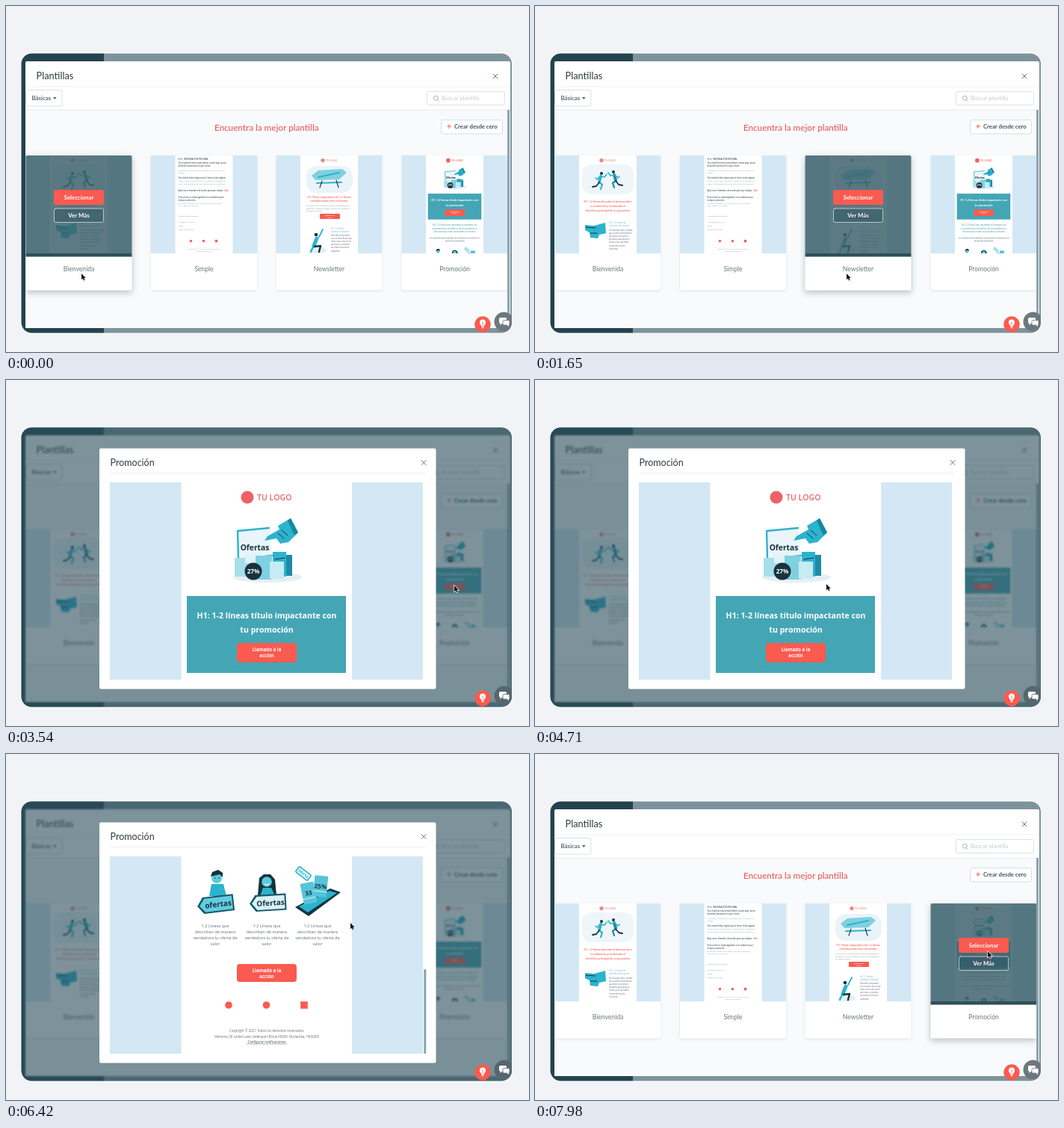
These frames come from a looping animation (700x463 px, 8000 ms). An HTML page with a canvas:

```html
<!DOCTYPE html>
<html lang="es">
<head>
<meta charset="utf-8">
<title>Plantillas</title>
<style>
html, body { margin: 0; width: 100%; height: 100%; overflow: hidden; background: #f1f3f6; }
canvas { display: block; width: 100%; height: 100%; }
</style>
</head>
<body>
<canvas id="stage"></canvas>
<script>
const W = 700, H = 463, LOOP = 8000;
const UI = 'Lato, sans-serif', MAIL = '"Open Sans", sans-serif';
const RED = '#fb5a50', TEAL = '#44a6b5', CYAN = '#2cb3ce', INK = '#16333e', BLUE = '#d3e8f4';
const OPEN = 3050, CLOSE = 7080, SCROLL_MAX = 353, PAGE_H = 617, THUMB_SCALE = 0.336;
const ratio = window.devicePixelRatio || 1;

function makeContext(canvas) {
  canvas.width = W * ratio;
  canvas.height = H * ratio;
  const ctx = canvas.getContext('2d');
  ctx.scale(ratio, ratio);
  return ctx;
}
const stage = makeContext(document.getElementById('stage'));
const sceneCanvas = document.createElement('canvas');
const scene = makeContext(sceneCanvas);
let c = scene;

// ---- time helpers ----
const clamp = v => Math.max(0, Math.min(1, v));
const smooth = v => { v = clamp(v); return v * v * (3 - 2 * v); };
const mix = (a, b, k) => a + (b - a) * k;

function track(keys, t) {
  let i = 1;
  while (i < keys.length - 1 && keys[i][0] < t) i++;
  const a = keys[i - 1], b = keys[i];
  const k = smooth((t - a[0]) / (b[0] - a[0]));
  return a.slice(1).map((v, n) => mix(v, b[n + 1], k));
}

const pointerKeys = [
  [0, 101, 358], [300, 101, 358], [800, 258, 360], [1000, 266, 360], [1500, 417, 358],
  [1800, 417, 358], [2350, 592, 330], [2700, 601, 277], [3540, 600, 275], [3700, 600, 275],
  [4500, 390, 273], [5700, 390, 273], [6420, 461, 226], [6900, 558, 109], [7150, 558, 109],
  [7750, 606, 264], [8000, 606, 264]
];
const scrollKeys = [[4950, 0], [5160, 305], [5320, SCROLL_MAX]];
const pointer = t => track(pointerKeys, Math.max(0, t));
const dialogOpen = t => t >= OPEN && t < CLOSE;
const dialogAmount = t => smooth((t - OPEN) / 300) * (1 - smooth((t - CLOSE) / 250));

// Share of the last 200 ms that the pointer spent over the card
function hoverAmount(card, t) {
  let hits = 0;
  for (let i = 0; i < 20; i++) {
    const s = t - i * 10, [x, y] = pointer(s);
    if (!dialogOpen(s) && x >= card.x && x <= card.x + 142 && y >= 200 && y <= 380) hits++;
  }
  return hits / 20;
}

// ---- drawing helpers ----
function rect(x, y, w, h, color) { c.fillStyle = color; c.fillRect(x, y, w, h); }

function box(x, y, w, h, r, fill, stroke, width = 1) {
  c.beginPath();
  c.roundRect(x, y, w, h, r);
  if (fill) { c.fillStyle = fill; c.fill(); }
  if (stroke) { c.strokeStyle = stroke; c.lineWidth = width; c.stroke(); }
}

function disc(x, y, r, color) {
  c.beginPath();
  c.arc(x, y, r, 0, 7);
  c.fillStyle = color;
  c.fill();
}

function oval(x, y, rx, ry, color) {
  c.beginPath();
  c.ellipse(x, y, rx, ry, 0, 0, 7);
  c.fillStyle = color;
  c.fill();
}

function trace(points) {
  c.beginPath();
  for (let i = 0; i < points.length; i += 2) c.lineTo(points[i], points[i + 1]);
}
function poly(points, color) { trace(points); c.closePath(); c.fillStyle = color; c.fill(); }

function line(points, color, width = 1) {
  trace(points);
  c.strokeStyle = color;
  c.lineWidth = width;
  c.lineCap = c.lineJoin = 'round';
  c.stroke();
}

function text(s, x, y, size, color, { weight = 400, align = 'left', font = UI } = {}) {
  c.font = `${weight} ${size}px ${font}`;
  c.fillStyle = color;
  c.textAlign = align;
  c.fillText(s, x, y);
}
const mail = (s, x, y, size, color, weight = 400, align = 'center') =>
  text(s, x, y, size, color, { weight, align, font: MAIL });

function placed(x, y, angle, scale, draw) {
  c.save();
  c.translate(x, y);
  c.rotate(angle);
  c.scale(scale, scale);
  draw();
  c.restore();
}

function cross(x, y, r) {
  line([x - r, y - r, x + r, y + r], '#69757c');
  line([x + r, y - r, x - r, y + r], '#69757c');
}

// ---- mail templates ----
function socialMarks(x, y, gap, r) {
  disc(x, y, r, RED);
  disc(x + gap, y, r, RED);
  rect(x + 2 * gap - r, y - r, 2 * r, 2 * r, RED);
}

function smallLogo() {
  disc(30, 6.6, 2.7, '#f08582');
  mail('TU LOGO', 34, 8, 3.5, '#f08582', 600, 'left');
}

function runner(x, y, dir, shirt) {
  c.save();
  c.translate(x, y);
  c.scale(dir, 1);
  disc(2, -9, 2, INK);
  line([1, -5, -1, 2], shirt, 4);
  line([1, -5, 6, -4, 9, -8], CYAN, 1.6);
  line([0, -5, -4, -1, -6, -3], CYAN, 1.6);
  line([-1, 3, 3, 6, 1, 12], shirt, 2.2);
  line([-1, 3, -5, 8, -10, 9], INK, 1.8);
  c.restore();
}

function paragraph(lines, x, y, step, size, color) {
  lines.forEach((s, i) => mail(s, x, y + i * step, size, color, 400, 'left'));
}

function welcomePage() {
  smallLogo();
  box(4, 12, 69, 40, 12, '#eff6fa');
  runner(28, 33, 1, CYAN);
  runner(48, 31, -1, '#1d8ca5');
  mail('H1: 1-2 líneas describe la bienvenida a', 38.5, 63.3, 3.5, RED, 600);
  mail('tu audiencia y recalcando el', 38.5, 69.3, 3.5, RED, 600);
  mail('beneficio principal de tu propuesta', 38.5, 75.3, 3.5, RED, 600);
  poly([8, 93, 20, 94, 35, 90, 36, 104, 27, 106, 25, 111, 15, 110, 14, 103, 8, 100], CYAN);
  line([9, 96, 22, 97], INK, 1);
  line([15, 104, 24, 104], INK, 1);
  paragraph(['H2: 1-2 líneas de', 'subtítulo de soporte'], 40, 91, 4, 2.9, '#68b5c1');
  paragraph(['Un mensaje claro y simple', 'que cuente los beneficios', 'que tiene tu servicio o', 'producto para quien lo',
    'recibe y por qué debe', 'conocerlo más de', 'cerca hoy'], 40, 101, 4.1, 2.6, '#5d6b72');
}

const letter = [
  [6, 'Hi Sr. INFORMACIÓN PERSONAL', 1], [11, 'Tus emails de bienvenida deben contar algo nuevo', 1],
  [14.5, 'describe claramente lo que tienes', 1], [20.5, 'Propuesta y cuerpo de un mensaje para el cliente y su', 0],
  [24, 'equipo', 0], [31, 'Tus emails deben lograr que el lector tome alguna', 1],
  [35, 'acción, usa un tono cercano y muestra con claridad los', 0], [39, 'datos más importantes de tu oferta para tu audiencia', 0],
  [48, 'Aquí va un llamado a la acción para que ubique', 1], [57, 'Para cerrar tu email agradece a tu audiencia por', 1],
  [61, 'tiempo y atención', 1], [64.5, 'recuerda compartir tus datos y los de tu empresa', 0],
  [68, 'para seguir en contacto', 0], [82, 'Atentamente tu equipo', 0], [90, 'NOMBRE APELLIDO', 0],
  [95, 'Cargo', 0], [100, 'Datos de contacto', 0]
];

function letterPage() {
  letter.forEach(([y, s, bold]) => mail(s, 4, y, bold ? 2.65 : 2.5, bold ? '#4a5961' : '#7b878d', bold ? 600 : 400, 'left'));
  mail('link', 66, 48, 2.65, RED, 700, 'left');
  socialMarks(21, 114.5, 17, 1.7);
  mail('Copyright © 2021 Todos los derechos reservados', 38.5, 126, 1.9, '#8b969b');
  mail('Configurar notificaciones', 38.5, 129, 1.9, '#8b969b');
}

function newsPage() {
  smallLogo();
  box(8, 14, 62, 36, 14, '#eaf4f8');
  poly([15, 27, 24, 20, 56, 18, 62, 23, 52, 32, 20, 33], '#7fd0e0');
  line([24, 29, 52, 23], CYAN, 2);
  line([22, 37, 55, 36], CYAN, 2);
  line([29, 34, 26, 43], INK, 1.1);
  line([48, 33, 51, 43], INK, 1.1);
  mail('H1: Título impactante de 1-2 líneas', 38.5, 56.5, 3.5, RED, 600);
  mail('introduciendo este contenido', 38.5, 61.5, 3.5, RED, 600);
  paragraph(['El cuerpo va a ser simple, cuenta la novedad de tu', 'empresa a quienes te leen y resume los beneficios',
    'de seguir leyendo'], 8, 68, 3.6, 2.5, '#65737a');
  box(26, 78, 27, 7, 1, RED);
  mail('Llamado a la', 39.5, 81, 2.1, '#fff', 700);
  mail('acción', 39.5, 83.5, 2.1, '#fff', 700);
  oval(23, 127, 12, 4, '#e0f0f5');
  line([30, 99, 25, 109], CYAN, 1.8);
  disc(21, 106, 2.3, INK);
  line([22, 111, 18, 121], CYAN, 5);
  line([18, 122, 27, 121, 25, 129], INK, 2.4);
  line([17, 122, 14, 129], CYAN, 2.4);
  paragraph(['H2: 1-2 líneas', 'subtítulo relevante'], 41, 99, 4, 2.8, '#68b5c1');
  paragraph(['Describe la novedad', 'con un texto breve que', 'invite a leer más de lo', 'que haces y muestre', 'un enlace al artículo', 'completo'],
    41, 108, 4.1, 2.6, '#5d6b72');
}

function callButton(y, h) {
  box(75, y, 80, h, 4, RED);
  mail('Llamado a la', 115, y + 10.5, 6.1, '#fff', 700);
  mail('acción', 115, y + 18.5, 6.1, '#fff', 700);
}

function offerScene() {
  oval(116, 127, 46, 7, '#e6eff3');
  poly([76, 65, 118, 61, 122, 98, 77, 103], '#e9f5f9');
  line([122, 98, 77, 103, 76, 65, 118, 61], CYAN, 2.4);
  rect(72, 101, 26, 25, '#a6dfea');
  rect(86, 96, 18, 12, '#e0f3f7');
  rect(100, 98, 22, 32, '#7fd0e0');
  rect(123, 93, 18, 33, CYAN);
  rect(141, 97, 8, 28, '#1d8ca5');
  rect(119, 106, 19, 23, '#c6ebf2');
  line([126, 103, 139, 101], INK, 1.2);
  poly([112, 78, 116, 72, 132, 63, 130, 58, 147, 48, 157, 67, 144, 80, 133, 82, 128, 75], CYAN);
  poly([143, 51, 147, 48, 157, 67, 152, 71], '#1787a2');
  line([130, 68, 138, 75], INK, 1);
  line([135, 64, 143, 71], INK, 1);
  mail('Ofertas', 99, 91, 10.3, INK, 700);
  disc(97, 119, 11.5, INK);
  mail('27%', 97, 122, 8.2, '#fff', 700);
}

function tagSign(x, y, angle, word, fill, ink) {
  placed(x, y, angle, 1, () => {
    poly([-25, 0, -17, -11, 24, -11, 24, 11, -17, 11], '#15586a');
    poly([-22, 0, -15, -9, 22, -9, 22, 9, -15, 9], fill);
    mail(word, 3, 4, 10, ink, 700);
  });
}

function ticket(x, y, angle, word) {
  placed(x, y, angle, 1, () => {
    box(-9, -14, 18, 28, 1, '#56c4d8');
    line([-9, 7, 9, 7], '#d8f1f6', 1);
    mail(word, 0, 3, 8, INK, 700);
  });
}

function offerPeople() {
  poly([38, 406, 41, 390, 57, 390, 61, 406], CYAN);
  disc(48, 382, 7, '#5ccbdc');
  poly([40, 380, 42, 374, 50, 371, 56, 375, 56, 381, 52, 377], INK);
  disc(46, 382, 0.8, INK);
  disc(51, 382, 0.8, INK);
  tagSign(47, 417, -0.12, 'ofertas', '#62cde0', INK);

  poly([103, 405, 105, 382, 111, 377, 120, 377, 126, 384, 128, 405], INK);
  disc(115, 387, 6.8, '#5ccbdc');
  line([112, 390, 115, 391.5, 118, 390], '#fff', 1.2);
  poly([106, 406, 110, 395, 121, 395, 126, 406], CYAN);
  tagSign(117, 415, -0.06, 'Ofertas', '#d9f1f6', INK);

  poly([153, 421, 200, 396, 214, 401, 171, 433], INK);
  poly([158, 420, 199, 399, 209, 402, 170, 428], CYAN);
  ticket(171, 402, -0.2, '33');
  ticket(187, 393, 0.1, '25%');
  placed(164, 376, 0.65, 1, () => {
    box(-10, -4.5, 20, 9, 1.5, '#e5f6f9', CYAN, 1.6);
    mail('Oferta', 0, 1.8, 5, CYAN, 700);
  });
}

function promoPage() {
  disc(89, 20, 8.5, '#ee6264');
  mail('TU LOGO', 102, 24, 10.6, '#ee6264', 600, 'left');
  offerScene();
  rect(8, 152, 213, 103, TEAL);
  mail('H1: 1-2 líneas título impactante con', 115, 182, 10.6, '#fff', 700);
  mail('tu promoción', 115, 201, 10.6, '#fff', 700);
  callButton(215, 26);
  ['H2: 1-2 líneas que describan lo relevante de', 'tu promoción y beneficios de los productos o',
    'servicios que están vinculados a la misma'].forEach((s, i) => mail(s, 115, 280 + 14 * i, 8.4, '#65a9b5', 600));
  mail('H3: Subtítulo para presentar los productos o servicios de la', 115, 329.5, 6.9, '#435861', 700);
  mail('forma más vendedora', 115, 341.5, 6.9, '#435861', 700);
  offerPeople();
  for (const x of [46, 115, 183]) {
    ['1-2 Líneas que', 'describan de manera', 'vendedora tu oferta de', 'valor']
      .forEach((s, i) => mail(s, x, 448 + 8 * i, 5.5, '#5f6e75'));
  }
  callButton(497, 24);
  socialMarks(64, 552, 50.5, 4.8);
  mail('Copyright © 2021 Todos los derechos reservados', 115, 588, 4.4, '#5f6e75');
  mail('Velmora, 00 Lindel Lane, Aldenport Brisia 00000, Norlandia, +000000', 115, 595.5, 4.4, '#5f6e75');
  mail('Configurar notificaciones', 115, 602.5, 4.4, '#3f4f57');
  line([88, 604, 142, 604], '#3f4f57', 0.4);
}

const cards = [
  { x: 26.5, name: 'Bienvenida', page: welcomePage, scale: 1 },
  { x: 194, name: 'Simple', page: letterPage, scale: 1 },
  { x: 361.5, name: 'Newsletter', page: newsPage, scale: 1 },
  { x: 529.5, name: 'Promoción', page: promoPage, scale: THUMB_SCALE }
];

// ---- gallery ----
function drawCard(card, hover) {
  const { x, name, page, scale } = card, mid = x + 71;
  c.save();
  c.shadowColor = `rgba(40,60,70,${mix(0.13, 0.3, hover)})`;
  c.shadowBlur = mix(3, 9, hover) * ratio;
  c.shadowOffsetY = mix(1, 3, hover) * ratio;
  box(x, 200, 142, 180.5, 2, '#fff');
  c.restore();

  c.save();
  c.beginPath();
  c.rect(x, 200, 142, 131);
  c.clip();
  rect(x, 200, 142, 131, BLUE);
  rect(x + 32.5, 200, 77, 131, '#fff');
  placed(x + 32.5, 200, 0, scale, page);
  c.restore();

  if (hover) {
    c.save();
    c.globalAlpha = hover;
    box(x, 200, 142, 131, [2, 2, 0, 0], 'rgba(60,97,108,.84)');
    rect(x, 331, 142, 4.5, '#2f4f5b');
    const bold = { weight: 700, align: 'center' };
    box(x + 37.5, 246, 67, 20, 2, RED);
    text('Seleccionar', mid, 258.7, 7.8, '#fff', bold);
    box(x + 38, 271, 66, 18.5, 2, 'rgba(44,84,98,.5)', 'rgba(235,241,243,.75)', 0.9);
    text('Ver Más', mid, 283, 7.8, '#fff', bold);
    c.restore();
  }
  text(name, mid, 354.5, 8.6, '#6b787e', { align: 'center' });
}

function drawGallery(t) {
  rect(0, 0, W, H, '#7d939c');
  rect(20, 63, 111, 375, '#24434f');
  box(26, 74, 649, 357, 2, '#fff');
  rect(26, 139, 649, 292, '#f8fafb');
  rect(26, 107.5, 649, 1, '#f1f3f5');
  rect(26, 138.5, 649, 1, '#e8ecee');
  rect(671, 139, 3, 283, '#8ea5ae');

  text('Plantillas', 40.5, 98, 12.8, '#2d3a41');
  cross(655, 94, 3);
  box(26.5, 112.5, 48.5, 21.5, 2, '#fff', '#dbe1e5');
  text('Básicas', 34.5, 125.8, 7.8, '#58676f', { weight: 700 });
  poly([63, 122, 67.6, 122, 65.3, 125], '#58676f');

  box(563.5, 114.5, 104, 18, 2, '#fff', '#dbe1e5');
  c.beginPath();
  c.arc(575.3, 123.2, 2.9, 0, 7);
  c.strokeStyle = '#a9b5bb';
  c.lineWidth = 1;
  c.stroke();
  line([577.5, 125.5, 579.5, 127.5], '#a9b5bb');
  text('Buscar plantilla', 583, 126, 7.6, '#c3ccd1');

  text('Encuentra la mejor plantilla', 348.7, 167.3, 11.7, '#ea5b57', { align: 'center', weight: 500 });
  box(582.5, 152.5, 82, 18.5, 2, '#fff', '#d7dfe3');
  line([590.5, 161, 595.5, 161], RED);
  line([593, 158.5, 593, 163.5], RED);
  text('Crear desde cero', 600, 164.3, 7.7, '#43535b', { weight: 700 });

  c.save();
  c.beginPath();
  c.rect(26, 139, 645, 292);
  c.clip();
  cards.forEach(card => drawCard(card, hoverAmount(card, t)));
  c.restore();
}

// ---- preview dialog ----
function drawDialog(t, amount) {
  const [scroll] = track(scrollKeys, t);
  const painted = t < 5260 ? 400 : PAGE_H;
  c.save();
  c.globalAlpha = amount;
  c.translate(0, -18 * (1 - amount));
  box(125, 91.5, 450.5, 322, 2, '#fff');
  text('Promoción', 139.5, 115, 12.5, '#2d3a41');
  cross(559, 110.5, 3);
  rect(139, 124, 422, 1, '#eceff1');

  c.save();
  c.beginPath();
  c.rect(139, 137, 419, Math.min(264, painted - scroll));
  c.clip();
  rect(139, 137, 95.5, 264, BLUE);
  rect(463, 137, 95, 264, BLUE);
  placed(234, 137 - scroll, 0, 1, promoPage);
  c.restore();

  const thumbAlpha = clamp((t - 4960) / 100);
  if (thumbAlpha) {
    // The scrollbar follows the page with a short delay
    const offset = 151 * smooth((t - 5180) / 150);
    c.globalAlpha = amount * thumbAlpha;
    box(559.3, 137 + offset, 3, 113, 1, '#86a5af');
  }
  c.restore();
}

function drawBubbles(amount) {
  const grey = amount > 0.5 ? '#55676e' : '#6c787e';
  disc(666.5, 422.5, 13, grey);
  box(660, 417, 10, 7.5, 1.5, '#fff');
  poly([661.5, 424, 665, 424, 661.5, 427], '#fff');
  box(665, 420.5, 9, 6.5, 1.5, '#fff', grey, 0.8);
  poly([670, 426.5, 673, 426.5, 673, 429], '#fff');
  disc(638, 426, 10.7, RED);
  disc(638, 423.5, 4, '#fff');
  poly([635.2, 425.5, 640.8, 425.5, 639.6, 429, 636.4, 429], '#fff');
  rect(636.5, 429.6, 3, 1.6, '#fff');
  line([638, 423, 638, 427], RED, 0.8);
}

function drawPointer(t) {
  const [x, y] = pointer(t);
  const onButton = !dialogOpen(t) && cards.some(k => x > k.x + 37 && x < k.x + 105) &&
    ((y > 246 && y < 263) || (y > 271 && y < 290));
  placed(x, y, 0, 1, () => {
    const shape = onButton
      ? [-0.8, 0, 0.8, 0, 1, 3.2, 4.4, 4, 4.6, 7, 3.4, 9.5, -1, 9.5, -3.6, 6, -2.8, 5.2, -1, 6]
      : [0, 0, 0, 8.2, 1.9, 6.5, 3.1, 9.4, 4.5, 8.8, 3.3, 6, 5.8, 5.9];
    trace(shape);
    c.closePath();
    c.strokeStyle = onButton ? '#111' : '#fff';
    c.lineWidth = 1.3;
    c.stroke();
    c.fillStyle = onButton ? '#fff' : '#111';
    c.fill();
  });
}

const start = performance.now();

function render() {
  const t = (performance.now() - start) % LOOP;
  const amount = dialogAmount(t);
  c = scene;
  drawGallery(t);

  c = stage;
  rect(0, 0, W, H, '#f1f3f6');
  box(20.5, 63, 656.5, 375, 14, null, '#fbfcfd', 2);
  c.save();
  c.beginPath();
  c.roundRect(20.5, 63.5, 656.5, 374, 14);
  c.clip();
  if (amount) c.filter = `blur(${amount * ratio}px)`;
  c.drawImage(sceneCanvas, 0, 0, W, H);
  c.filter = 'none';
  if (amount) {
    rect(0, 0, W, H, `rgba(44,78,90,${0.61 * amount})`);
    drawDialog(t, amount);
  }
  drawBubbles(amount);
  c.restore();
  drawPointer(t);
  requestAnimationFrame(render);
}
render();
</script>
</body>
</html>
```
